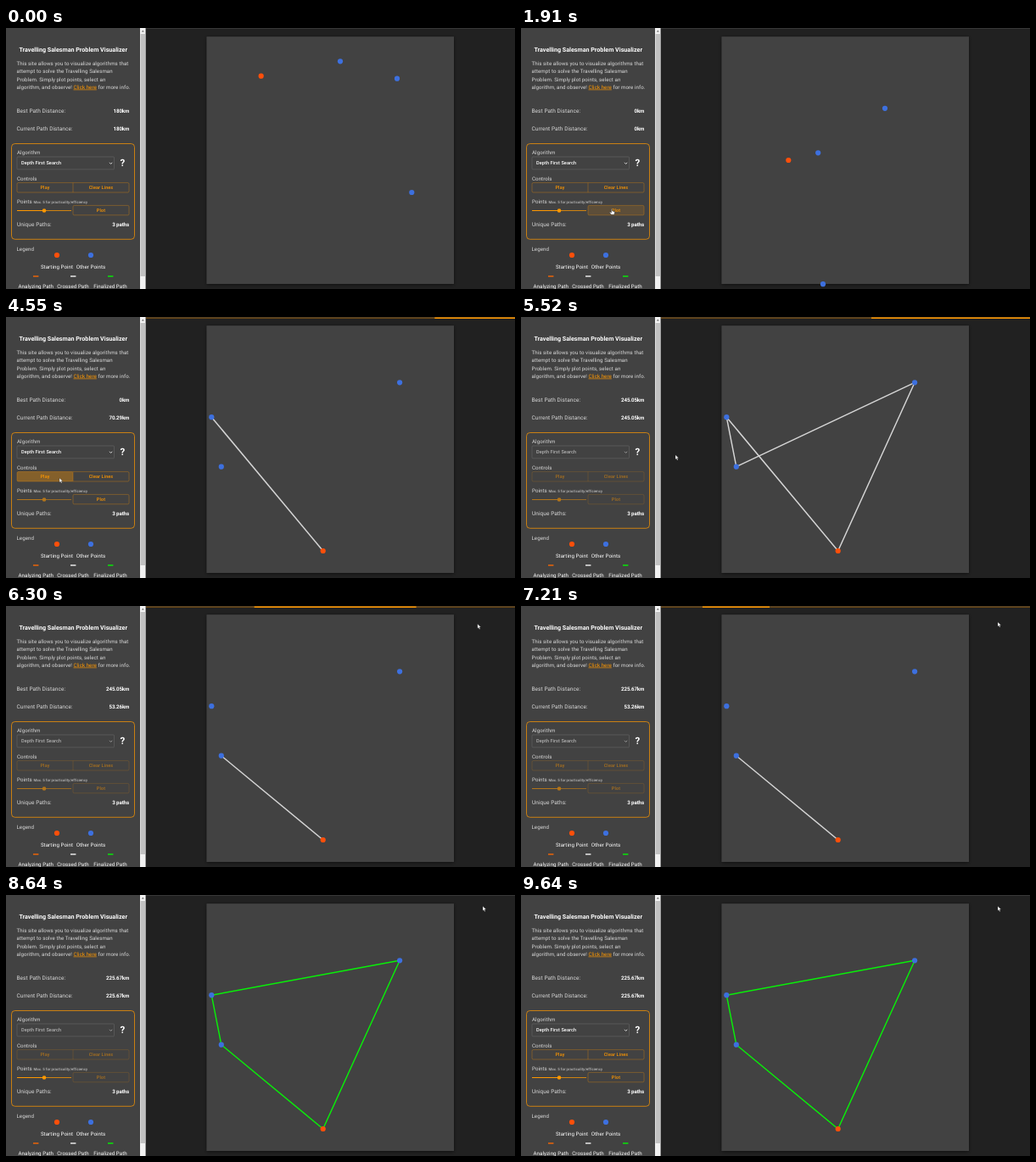
Recreate the animation shown at these times as an HTML page. Size 600x308 px, loop 9.7 s.

```html
<!DOCTYPE html>
<html lang="en">
<head>
<meta charset="utf-8">
<title>Path visualizer</title>
<style>
  html, body { margin: 0; width: 100%; height: 100%; overflow: hidden; background: #212121; }
  svg { display: block; width: 600px; height: 308px; }
  text { font-family: Roboto, Arial, sans-serif; font-size: 6.17px; letter-spacing: .00938em; fill: #d9d9d9; text-rendering: geometricPrecision; }
  .row { font-size: 6.5px; }
  .value { font-size: 6.2px; font-weight: 700; letter-spacing: -.02em; fill: #fff; text-anchor: end; }
  .title { font-size: 7.15px; font-weight: 700; letter-spacing: 0; fill: #fff; text-anchor: middle; }
  .key { fill: #fff; text-anchor: middle; }
  .link { fill: #ff9800; text-decoration: underline; text-decoration-thickness: .5px; text-underline-offset: .6px; }
  .btn { font-size: 5.4px; font-weight: 500; letter-spacing: .0286em; fill: #ff9800; text-anchor: middle; }
  .frame { fill: none; stroke: #ff9800; }
  .thin { stroke-width: .5; stroke-opacity: .6; }
</style>
</head>
<body>
<svg id="stage" viewBox="0 0 600 308">
  <defs>
    <filter id="shade" x="-10%" y="-10%" width="120%" height="120%">
      <feDropShadow dx="0" dy="1" stdDeviation="2" flood-color="#000" flood-opacity=".5"/>
    </filter>
  </defs>
  <rect width="600" height="308" fill="#212121"/>
  <rect width="158" height="308" fill="#424242"/>
  <rect x="158" width="6.6" height="308" fill="#f1f1f1"/>
  <rect x="158.6" y="7" width="5.6" height="286" fill="#c1c1c1"/>
  <path d="M159.8 4.6l1.5-1.8 1.5 1.8z" fill="#606060"/>
  <rect x="165" width="435" height=".8" fill="#3c3c3c"/>
  <rect x="236.5" y="10.2" width="291.5" height="291.8" fill="#424242" filter="url(#shade)"/>

  <text class="title" x="79.2" y="28">Travelling Salesman Problem Visualizer</text>
  <text x="12.5" y="44.3">This site allows you to visualize algorithms that</text>
  <text x="12.5" y="53.4">attempt to solve the Travelling Salesman</text>
  <text x="12.5" y="62.5">Problem. Simply plot points, select an</text>
  <text x="12.5" y="71.6">algorithm, and observe! <tspan class="link">Click here</tspan> for more info.</text>
  <text class="row" x="12.5" y="100">Best Path Distance:</text>
  <text class="value" id="best" x="145.3" y="100"></text>
  <text class="row" x="12.5" y="121.2">Current Path Distance:</text>
  <text class="value" id="current" x="145.3" y="121.2"></text>

  <rect class="frame" x="6.5" y="136.5" width="145" height="112.8" rx="4" stroke-width=".8" stroke-opacity=".9"/>
  <text x="13" y="149.2">Algorithm</text>
  <rect x="13" y="152" width="114.5" height="14.8" rx="1" fill="#424242" stroke="#6c6c6c" stroke-width=".5"/>
  <g id="select">
    <text x="18" y="161.4" style="font-size:5.6px;font-weight:500;fill:#fff">Depth First Search</text>
    <path d="M122 158.8l1.6 1.6 1.6-1.6" fill="none" stroke="#fff" stroke-width=".8"/>
  </g>
  <text class="key" x="137.4" y="163.2" style="font-size:11.5px;font-weight:700">?</text>
  <text x="13" y="180.1">Controls</text>
  <rect id="playFill" x="13" y="182.6" width="66" height="11.4" rx="1.5" fill="#ff9800"/>
  <rect id="plotFill" x="79" y="209.4" width="66" height="11.4" rx="1.5" fill="#ff9800"/>
  <g id="buttons">
    <rect class="frame thin" x="13" y="182.6" width="132" height="11.4" rx="1.5"/>
    <path class="frame thin" d="M79 182.6v11.4"/>
    <rect class="frame thin" x="79" y="209.4" width="66" height="11.4" rx="1.5"/>
    <text class="btn" x="46" y="190.2">Play</text>
    <text class="btn" x="112" y="190.2">Clear Lines</text>
    <text class="btn" x="112" y="217.1">Plot</text>
  </g>
  <text x="13" y="207.2">Points</text>
  <text x="32.5" y="207.2" style="font-size:4.35px">Max. 5 for practicality/efficiency</text>
  <g id="slider" fill="#ff9800">
    <rect x="13" y="215" width="32" height="1"/>
    <rect x="45" y="215" width="32" height="1" opacity=".75"/>
    <circle cx="45" cy="215.5" r="2.3"/>
  </g>
  <text class="row" x="13" y="234.4">Unique Paths:</text>
  <text class="value" x="145" y="234.4">3 paths</text>

  <text x="12.5" y="262.7">Legend</text>
  <circle cx="60" cy="268" r="3.1" fill="#ff4f0a"/>
  <circle cx="100" cy="268" r="3.1" fill="#3d70df"/>
  <text class="key" x="60" y="284">Starting Point</text>
  <text class="key" x="100" y="284">Other Points</text>
  <rect x="32" y="292.2" width="6.4" height="1.6" fill="#e0610c"/>
  <rect x="76" y="292.2" width="6.4" height="1.6" fill="#dedede"/>
  <rect x="120" y="292.2" width="6.4" height="1.6" fill="#0bdc0b"/>
  <text class="key" x="35.3" y="306.6">Analyzing Path</text>
  <text class="key" x="79" y="306.6">Crossed Path</text>
  <text class="key" x="123" y="306.6">Finalized Path</text>

  <g id="progress">
    <rect x="165" y=".5" width="435" height="1.5" fill="#6b4715"/>
    <rect id="bar1" y=".5" height="1.5" fill="#ff9800"/>
    <rect id="bar2" y=".5" height="1.5" fill="#ff9800"/>
  </g>
  <path id="tour" fill="none" stroke-width="1.45" stroke-linejoin="round"/>
  <g id="dots"></g>
  <g id="cursor">
    <path id="arrow" d="M0 0v5.2l1.2-1.1 .9 2 1-.4-.9-2h1.7z" fill="#fff" stroke="#222" stroke-width=".3"/>
    <path id="hand" d="M-.6 .3q.6-.8 1.2 0v2.2l2.4.6q.7.3.5 1.2l-.5 2.4h-3.6l-2-2.5q0-.9.8-.6l1.2.8z" fill="#fff" stroke="#111" stroke-width=".45"/>
  </g>
</svg>
<script>
const LOOP = 9700, PLOT1 = 1900, PLOT2 = 3400, PLAY = 4460, FIRST = 4545, STEP = 330, DONE = 8600;
const $ = id => document.getElementById(id);
const show = (id, on) => $(id).setAttribute('visibility', on ? 'visible' : 'hidden');
const set = (el, attrs) => { for (const k in attrs) el.setAttribute(k, attrs[k]); };
const clamp = x => Math.min(1, Math.max(0, x));
const ramp = (t, a, b) => clamp((t - a) / (b - a));

// the first point of each layout is the start
const layouts = [
  [[300.7, 56.7], [394, 39.3], [461, 59.7], [478.3, 194]],
  [[315.3, 156], [350.2, 147.3], [429, 94.8], [356, 302.2]],
  [[373.7, 276], [242.3, 118.2], [253.8, 176.7], [464.1, 77.3]]
];
const km = { SA: 70.29, SB: 53.26, SC: 74.87, AB: 20.45, AC: 77.09, BC: 79.44 };
const steps = 'SA SAB SABCS SAC SACBS SB SBA SBACS SB SBC SBCAS SC'.split(' ');
const bestTour = 'SBACS';

const length = path => [...path].slice(1).reduce((sum, b, i) => sum + (km[path[i] + b] || km[b + path[i]]), 0);
const label = d => (d ? d.toFixed(2) : '0') + 'km';
const isTour = path => path.length === 5;

const dots = layouts[0].map((_, i) => {
  const dot = document.createElementNS('http://www.w3.org/2000/svg', 'circle');
  set(dot, { r: 3.1, fill: i ? '#3d70df' : '#ff4f0a' });
  return $('dots').appendChild(dot);
});

function bezier(x1, y1, x2, y2) {
  const at = (a, b, s) => 3 * a * s * (1 - s) ** 2 + 3 * b * s * s * (1 - s) + s ** 3;
  return x => {
    let lo = 0, hi = 1;
    for (let i = 0; i < 22; i++) {
      const mid = (lo + hi) / 2;
      if (at(x1, x2, mid) < x) lo = mid; else hi = mid;
    }
    return at(y1, y2, (lo + hi) / 2);
  };
}
const sweep = bezier(.65, .815, .735, .395);
const dash = bezier(.165, .84, .44, 1);

// time, x, y of the pointer tip
const route = [
  [880, 74, 308], [1360, 107, 213.5], [3520, 107, 213.5], [4150, 63, 190], [4640, 63, 190],
  [5200, 182, 162.8], [5700, 182, 162.8], [6350, 562, 19], [7900, 562, 19], [8200, 562, 13.3], [LOOP, 562, 13.3]
];

function drawCursor(t) {
  show('cursor', t >= 880);
  const i = Math.max(1, route.findIndex(p => p[0] > t));
  const [a, b] = [route[i - 1], route[i]];
  const u = ramp(t, a[0], b[0]), e = u * u * (3 - 2 * u);
  const x = a[1] + (b[1] - a[1]) * e, y = a[2] + (b[2] - a[2]) * e;
  const overPlot = x > 79 && x < 145 && y > 209 && y < 221;
  const overPlay = x > 13 && x < 79 && y > 182.6 && y < 194;
  const hand = t >= 880 && t < PLAY && (overPlot || overPlay);
  $('cursor').setAttribute('transform', `translate(${x} ${y})`);
  $('arrow').style.display = hand ? 'none' : '';
  $('hand').style.display = hand ? '' : 'none';
  $('plotFill').setAttribute('opacity', hand && overPlot ? .14 : 0);
  const press = .12 + .23 * ramp(t, PLAY - 50, PLAY + 60);
  $('playFill').setAttribute('opacity', overPlay ? press * (1 - ramp(t, 4560, 4700)) : 0);
}

function drawBar(id, left, right) {
  const a = Math.max(0, left), b = Math.min(100, right);
  set($(id), { x: 165 + a * 4.35, width: Math.max(0, b - a) * 4.35 });
}

function drawProgress(t) {
  show('progress', t >= PLAY && t < DONE);
  const phase = (1165 + 1.991 * (t - 4550) + 4200) % 2100;
  const p = sweep(clamp(phase / 1260));
  drawBar('bar1', p * (72 + 28 * p * p), 190 * p);
  const q = dash(clamp(((phase - 1180 + 2100) % 2100) / 1260));
  drawBar('bar2', -200 + 307 * q, 108 * q);
}

function drawControls(t) {
  const off = ramp(t, 4560, 4700) * (1 - ramp(t, DONE + 60, DONE + 290));
  $('select').setAttribute('opacity', 1 - .42 * off);
  $('buttons').setAttribute('opacity', 1 - .45 * off);
  $('slider').setAttribute('opacity', t >= PLAY && t < DONE ? .6 : 1);
}

function drawPlot(t) {
  const pts = layouts[t < PLOT1 ? 0 : t < PLOT2 ? 1 : 2];
  dots.forEach((dot, i) => set(dot, { cx: pts[i][0], cy: pts[i][1] }));

  const n = t < FIRST ? -1 : Math.min(steps.length - 1, Math.floor((t - FIRST) / STEP));
  const done = t >= DONE;
  const path = done ? bestTour : n < 0 ? '' : steps[n];
  const found = steps.slice(0, n + 1).filter(isTour).map(length);
  const best = found.length ? Math.min(...found) : 0;
  set($('tour'), {
    d: path && 'M' + [...path].map(c => pts['SABC'.indexOf(c)].join(' ')).join('L'),
    stroke: done ? '#08f008' : '#d6d6d6'
  });
  $('best').textContent = t < PLOT1 ? '180km' : label(best);
  $('current').textContent = t < PLOT1 ? '180km' : label(path ? length(path) : 0);
}

function render(t) {
  drawPlot(t);
  drawControls(t);
  drawProgress(t);
  drawCursor(t);
}

const began = performance.now();
function tick() {
  render((performance.now() - began) % LOOP);
  requestAnimationFrame(tick);
}
tick();
</script>
</body>
</html>
```
